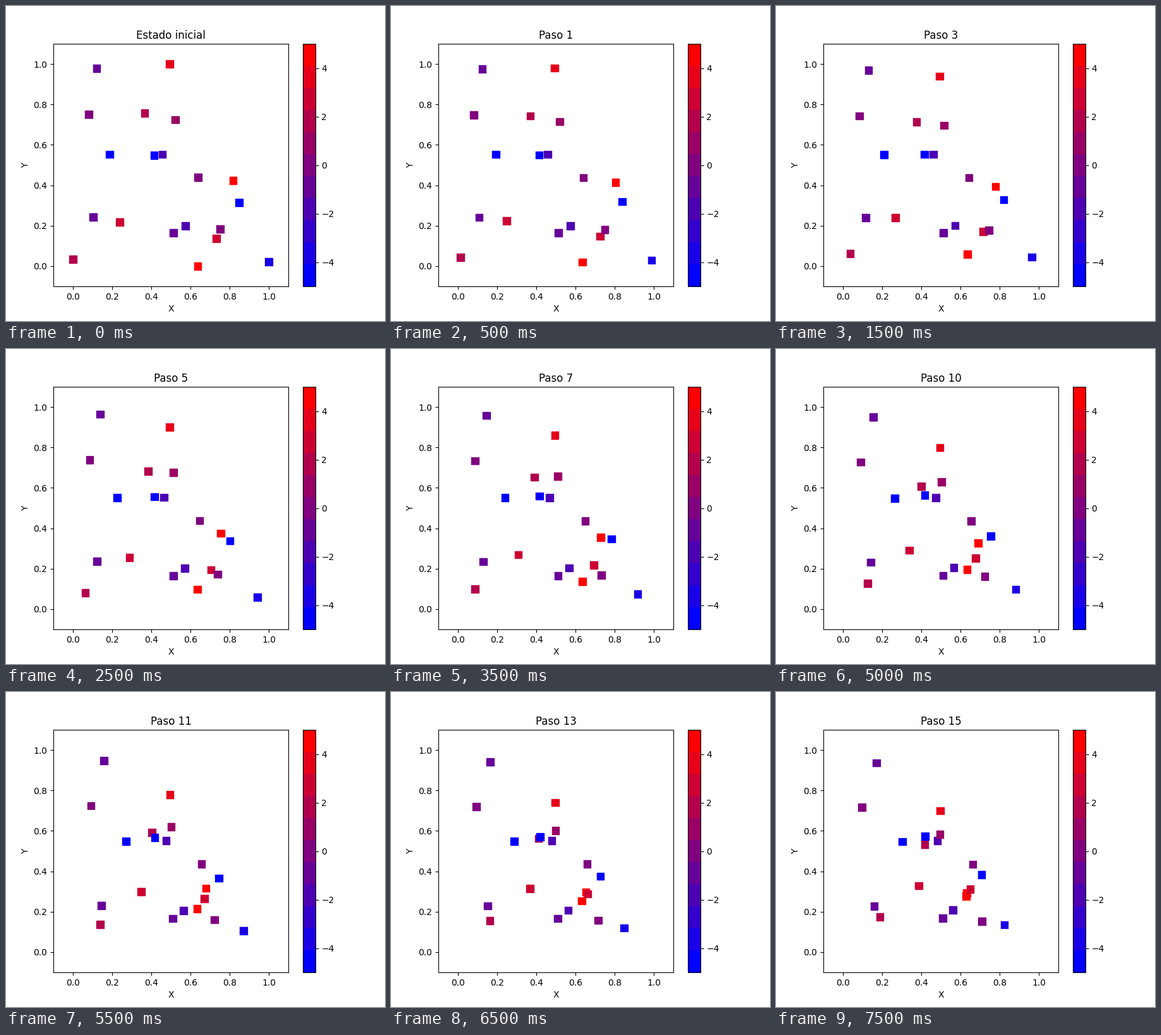
Recreate the animation shown at these times as a matplotlib script. Size 600 by 500 pixels, loop 8 s.

```python
import numpy as np
import matplotlib.pyplot as plt
from matplotlib.animation import FuncAnimation
from matplotlib.colors import LinearSegmentedColormap

STEPS = 16
INTERVAL = 500

# charge, start x, start y, velocity x, velocity y (pixels, y down)
particles = np.array([
    (-1, 143.6, 99.2, 1.02, 0.885),
    (4, 258.9, 92.08, 0.07, 6.43),
    (0, 130.7, 172.2, 0.35, 0.74),
    (2, 219.4, 169.8, 1.08, 4.83),
    (-5, 163.8, 235.4, 2.41, 0.13),
    (-5, 234.4, 237.1, 0.11, -0.53),
    (-2, 247.5, 235.4, 0.54, 0.05),
    (1, 267.8, 180.4, -0.56, 3.06),
    (0, 303.9, 272.3, 0.50, 0.075),
    (5, 303.4, 412.917, -0.09, -6.27),
    (5, 359.4, 277.0, -3.91, 3.12),
    (-5, 369.2, 311.8, -2.91, -1.47),
    (-1, 138.3, 335.3, 1.14, 0.31),
    (3, 179.9, 343.2, 3.09, -2.38),
    (-1, 265.3, 360.2, -0.09, -0.06),
    (-2, 284.3, 349.2, -0.29, -0.22),
    (3, 332.8, 369.2, -1.69, -3.75),
    (0, 339.3, 354.3, -0.87, 0.64),
    (2, 106.0, 401.8, 3.895, -3.0),
    (-4, 416.0, 405.82, -3.637, -2.42),
])
charge = particles[:, 0]
origin = np.array([106.0, 412.917])
scale = np.array([310.0, -385 / 1.2])
start = (particles[:, 1:3] - origin) / scale
velocity = particles[:, 3:5] / scale

fig, ax = plt.subplots(figsize=(6, 5), dpi=100)
cmap = LinearSegmentedColormap.from_list("charge", ["blue", "red"], N=11)
points = ax.scatter(start[:, 0], start[:, 1], c=charge, s=70, marker="s",
                    cmap=cmap, vmin=-5, vmax=5)
fig.colorbar(points, ax=ax)
ax.set(xlim=(-0.1, 1.1), ylim=(-0.1, 1.1), xlabel="X", ylabel="Y")
title = ax.set_title("Estado inicial")


def update(step):
    points.set_offsets(start + velocity * step)
    title.set_text(f"Paso {step}" if step else "Estado inicial")
    return points, title


anim = FuncAnimation(fig, update, frames=STEPS, interval=INTERVAL,
                     repeat=True, repeat_delay=0)
plt.show()
```
